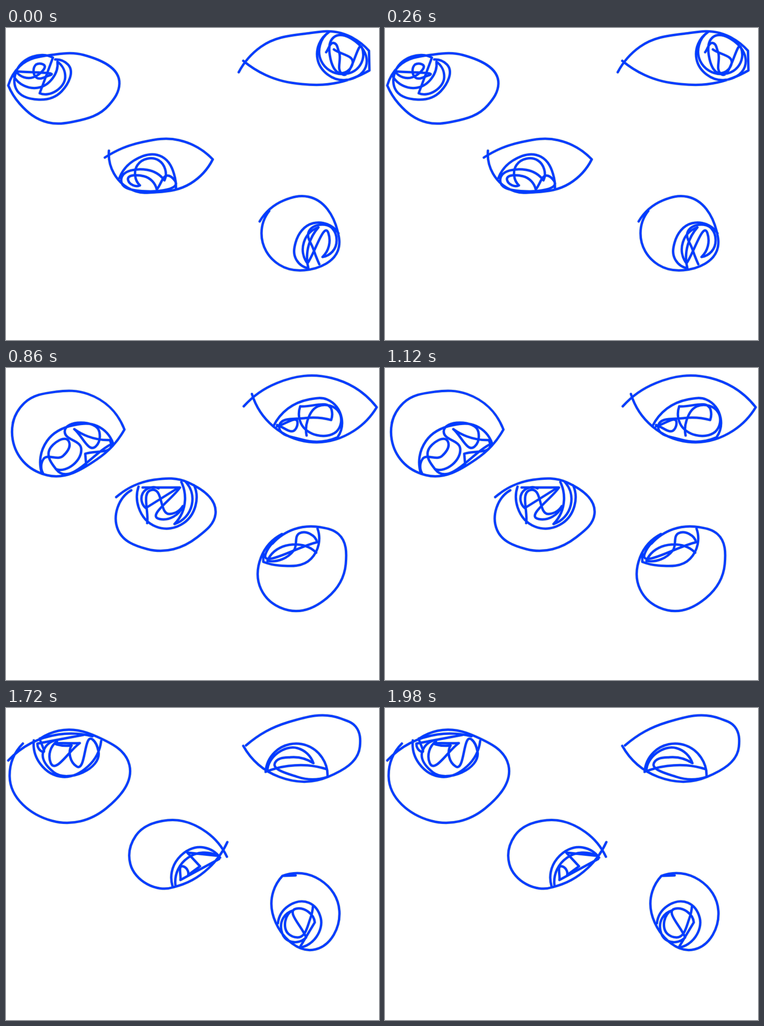
Recreate the animation shown at these times as an HTML page. Size 819x684 px, loop 2.15 s.

```html
<!DOCTYPE html>
<html lang="en">
<head>
<meta charset="utf-8">
<title>Scribbled eyes</title>
<style>
html, body { margin: 0; width: 100%; height: 100%; overflow: hidden; background: #fff; }
svg { display: block; width: 100vw; height: 100vh; }
path { fill: none; stroke-linecap: round; stroke-linejoin: round; }
.halo { stroke: #cdd6d0; stroke-width: 7.4; opacity: .6; }
.ink { stroke: #003cff; stroke-width: 5; }
</style>
</head>
<body>
<svg id="stage" viewBox="0 0 819 684"></svg>
<script>
const STEP = 430;
const BEND = 0.36; // handle length relative to the chord
const stage = document.getElementById('stage');
const poses = [];

const sub = (a, b) => [a[0] - b[0], a[1] - b[1]];
const dot = (a, b) => a[0] * b[0] + a[1] * b[1];
const mix = (a, s, b, t) => [a[0] * s + b[0] * t, a[1] * s + b[1] * t];
const unit = v => mix(v, 1 / (Math.hypot(...v) || 1), v, 0);

// Round curve through a few points; open ends continue the neighbour's arc.
function smooth(points) {
  const last = points.length - 1;
  const chords = points.slice(1).map((p, i) => sub(p, points[i]));
  const tangents = points.map((p, i) => {
    if (i === 0 || i === last) return null;
    const a = chords[i - 1], b = chords[i];
    return unit(mix(unit(a), Math.hypot(...b), unit(b), Math.hypot(...a)));
  });
  const mirror = (tangent, chord) => {
    const u = unit(chord);
    const along = tangent ? dot(tangent, u) : 0;
    return along > 0.5 ? mix(u, 2 * along, tangent, -1) : u;
  };
  tangents[0] = mirror(tangents[1], chords[0]);
  tangents[last] = mirror(last > 1 ? tangents[last - 1] : null, chords[last - 1]);
  return chords.map((chord, i) => {
    const reach = BEND * Math.hypot(...chord);
    const c1 = mix(points[i], 1, tangents[i], reach);
    const c2 = mix(points[i + 1], 1, tangents[i + 1], -reach);
    return `C${c1} ${c2} ${points[i + 1]}`;
  }).join('');
}

// A stroke is "x y x y ..."; "|" marks a sharp corner after the point before it.
function stroke(text) {
  let pen = null;
  return text.split('|').map(run => {
    const points = run.match(/\d+ \d+/g).map(pair => pair.split(' ').map(Number));
    const move = pen ? '' : `M${points[0]}`;
    if (pen) points.unshift(pen);
    pen = points[points.length - 1];
    return points.length > 1 ? move + smooth(points) : move;
  }).join('');
}

function add(parent, tag, attributes = {}) {
  const node = document.createElementNS('http://www.w3.org/2000/svg', tag);
  for (const key in attributes) node.setAttribute(key, attributes[key]);
  return parent.appendChild(node);
}

const pose = () => poses.push(add(stage, 'g'));

// Lid outline first, then iris and scribble
function eye(...strokes) {
  const d = strokes.map(stroke).join('');
  const group = poses[poses.length - 1];
  for (const name of ['halo', 'ink']) add(group, 'path', { class: name, d });
}

pose();
eye('5 126 30 84 108 58 170 59 249 122 226 169 150 205 92 207 30 166 5 126',
  '103 65 24 92 22 133 72 157 122 139 136 80 108 69',
  '17 106 70 131 113 74 | 130 108 74 143 | 103 65',
  '22 95 95 104 66 108 66 80 | 82 80 60 108 22 95');
eye('511 97 560 41 660 12 735 11 797 50 | 798 93 | 740 117 650 123 570 103 521 72',
  '709 9 684 68 745 114 790 85 768 30 720 20 711 60 738 99 761 78 720 47',
  '703 53 720 33 731 52 738 101 782 44 775 85 738 101 692 72 709 9');
eye('217 284 300 250 380 246 454 288 | 405 341 330 360 285 358 237 319 226 269',
  '249 329 280 291 342 282 371 328 373 353',
  '294 345 289 300 335 290 348 334 | 310 311 253 333 310 358 371 335 358 324 331 354 | 303 325 268 333 294 345');
eye('557 424 610 378 664 370 728 445 731 480 655 531 600 519 561 450 578 401',
  '730 450 674 428 636 470 636 505 664 527',
  '664 527 665 475 686 437 | 654 470 662 516 | 708 450 695 502 | 717 490 717 440 | 665 446 675 485 688 518');

pose();
eye('9 121 60 73 135 49 200 54 250 91 255 140 205 205 75 221 | 32 175 15 112',
  '16 130 45 102 92 100 131 150 75 215 | 30 160 11 124',
  '61 208 67 131 98 181 | 78 178 90 145 78 110 38 118 32 158 100 143 129 143 78 219');
eye('513 95 550 53 640 9 710 13 793 102 | 735 145 685 147 562 80 547 51',
  '654 138 672 94 735 77 785 108 | 735 139 675 136 680 98 704 110 730 141 758 132',
  '673 128 735 99 770 112 | 768 93 711 80 | 725 128 | 675 136');
eye('224 284 320 266 400 266 441 286 450 320 380 373 291 390 244 342 243 286',
  '270 276 305 276 334 318 262 360 246 315 258 285 291 287 254 352',
  '332 292 273 290 275 340 308 325 282 308 260 345 282 353 310 303 252 307 | 325 338');
eye('562 418 573 390 630 349 690 348 735 405 730 475 665 519 588 510 557 450 573 390',
  '684 350 642 392 640 455 735 473 | 735 415 712 363 672 361',
  '684 350 647 445 | 660 447 711 414 | 680 445 690 467 | 725 452 732 472',
  '668 469 698 430 687 372 | 712 370 736 450',
  '707 387 657 422 | 657 395 700 386');

pose();
eye('15 120 40 77 110 52 180 57 260 135 | 200 200 90 235 38 205 20 105',
  '79 232 90 160 150 125 200 127 235 165',
  '235 165 110 222 95 180 138 161 125 193 82 200 82 232',
  '110 222 165 176 129 140 205 140 197 172 150 134 | 180 150 228 158 | 231 167 174 188 | 176 212');
eye('522 84 595 33 715 22 814 86 | 765 137 665 162 587 128 540 57',
  '587 128 665 69 705 69 737 110 728 152 | 650 157 600 128 655 110 714 114 | 715 92 646 84 | 648 122 725 140 | 732 98 685 84 662 115 660 148',
  '595 125 635 135 640 119 595 128');
eye('242 283 325 245 400 251 460 320 420 371 310 397 246 355 275 268',
  '291 260 291 305 330 348 390 340 413 257',
  '310 340 322 267 360 320 388 303 | 337 331 382 262 | 300 262',
  '376 264 307 307 | 300 275 335 264',
  '385 250 393 290 370 342 | 408 300 395 250');
eye('606 364 560 415 560 485 620 531 705 504 746 430 730 364 690 349 585 385',
  '565 405 | 565 425 | 600 433 670 418 684 352',
  '584 385 571 405 683 382 | 645 362 632 400 574 423 | 580 412 681 405');

pose();
eye('15 111 50 70 120 49 195 60 275 123 | 245 193 180 247 100 260 30 210 6 98',
  '188 60 130 115 165 190 215 200 265 150 275 123',
  '275 123 159 82 | 157 190 163 210 | 225 140 258 128 | 251 177 205 178 180 195',
  '231 67 155 90 141 150 162 158 | 185 122 272 124',
  '231 67 180 125 195 158 258 128',
  '246 178 228 152 235 192 275 123');
eye('518 84 580 35 715 11 785 45 789 110 725 147 605 134 | 540 84 525 60',
  '580 33 635 34 656 80 603 132 | 540 84 552 51 598 42 | 556 75 | 645 45 | 649 80 606 45 636 105 603 124 | 602 103 653 105',
  '541 88 615 68 652 84');
eye('267 270 320 238 400 236 489 348 | 395 382 320 385 265 345 264 285 281 258',
  '450 268 392 278 400 345 489 348 | 437 260 388 285',
  '460 310 425 263 392 300 413 338 | 424 292 411 287 400 330',
  '410 290 474 349 | 436 292 | 437 362');
eye('562 402 640 360 700 355 751 440 735 500 660 523 572 445 587 379',
  '572 403 605 375 640 381 660 435 640 489 608 495 | 580 435 605 378',
  '570 405 587 462 617 393 | 604 415 648 475 | 625 492 610 474 | 655 472',
  '618 395 | 619 465 641 410 618 395');

pose();
eye('5 115 115 58 190 62',
  '75 67 115 50 200 63 271 125 220 220 100 247 8 150 37 78',
  '61 71 75 122 125 151 180 128 209 72',
  '170 59 69 78 | 80 96 74 67',
  '105 72 82 95 105 141 203 95 190 69 155 128 144 82 | 112 80 162 77 | 98 120 112 73');
eye('527 82 620 31 735 23 768 41 777 85 707 151 600 151 521 83',
  '570 140 590 97 660 82 706 150',
  '574 138 640 88 675 121 | 625 108 592 118 640 151 706 151',
  '570 140 620 127 704 134');
eye('485 326 440 272 355 246 285 280 273 342 367 393 | 445 351 486 294',
  '366 392 378 330 435 306 470 328',
  '372 388 400 328 465 324 | 398 317 | 426 347 | 400 366 | 388 347 383 377 | 468 331');
eye('636 367 607 368 | 587 402 592 470 680 529 732 445 690 377 607 368',
  '597 472 620 434 665 427 691 460 645 525 | 678 470 | 637 440 659 503 | 620 510 609 460 630 444 | 620 495 640 503 668 462 674 435');

const begin = performance.now();

function draw() {
  const current = Math.floor((performance.now() - begin) / STEP) % poses.length;
  poses.forEach((group, i) => group.style.display = i === current ? '' : 'none');
  requestAnimationFrame(draw);
}
draw();
</script>
</body>
</html>
```
